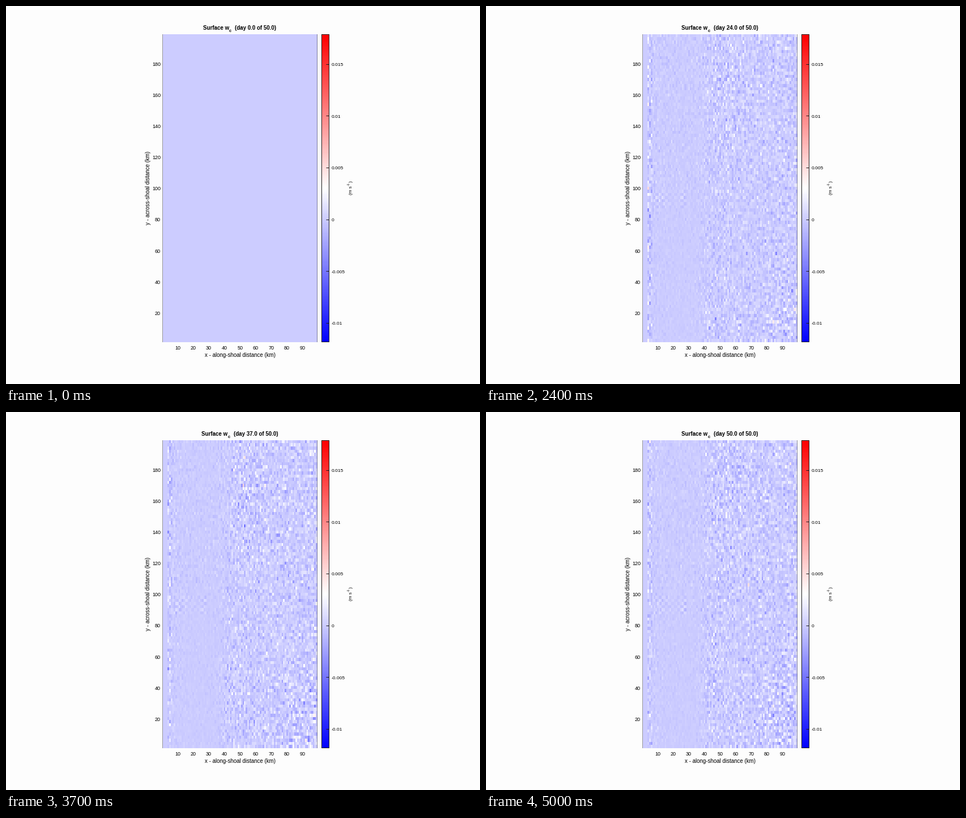
A matplotlib script that plays this animation: 837x669 px, repeating every 5.1 s.

```python
import numpy as np
import matplotlib.pyplot as plt
from matplotlib.animation import FuncAnimation
from matplotlib.colors import LinearSegmentedColormap
from matplotlib.patches import Rectangle

W, H, DPI = 837, 669, 72          # at 72 dpi one point is one pixel
DAYS = 50
N = 99                            # cells per side: 1 km wide, 2 km tall
LEFT, RIGHT, TOP, BOTTOM = 277, 550, 50, 595
VMIN, VMAX = -0.01184, 0.01784

plt.rcParams["font.family"] = "Liberation Sans"
cmap = LinearSegmentedColormap.from_list("bwr256", ["blue", "white", "red"], 256)

fig = plt.figure(figsize=(W / DPI, H / DPI), dpi=DPI, facecolor="#fdfdfd")
ax = fig.add_axes([0, 0, 1, 1])
ax.axis("off")

X, Y = np.meshgrid(np.arange(N) + 1.0, 197.7 - 2 * np.arange(N))


def bump(x0, y0, sx, sy):
    return np.exp(-((X - x0) / sx) ** 2 - ((Y - y0) / sy) ** 2)


def step(v, centre, width):
    return 1 / (1 + np.exp(-(v - centre) / width))


def smooth(v):
    v = np.clip(v, 0, 1)
    return v * v * (3 - 2 * v)


def amplitude(day):
    """Spread of the vertical velocity in mm/s."""
    late = smooth((day - 7) / 22)
    early = 1 - late
    grow = smooth((day + 4) / 26)
    north = step(Y, 100, 4)
    amp = 0.15 + 0.1 * north
    amp = amp + (1.1 - 0.4 * late) * np.exp(-((X - 4.6) / 1.5) ** 2)
    amp += (0.45 - 0.1 * late) * np.exp(-(X - 4) / 5)
    amp += early * 0.28 * north * np.exp(-X / 35)
    amp += 0.2 * early * step(Y, 175, 10)
    amp += late * 0.62 * step(X, 41, 2.5)
    amp += late * 0.4 * bump(55, 165, 11, 45)
    amp += (0.85 - 0.5 * late) * bump(44, 20 + day / 2, 6, 40)
    amp += 0.3 * early * bump(45, 85, 7, 30)
    amp += grow * 0.6 * bump(94, 10, 26, 42)
    amp += 0.5 * bump(97, 5, 6, 16) * early
    amp += (0.5 - 0.35 * late) * np.exp(-(99 - X) / 4)
    amp *= 1 - 0.65 * early * bump(73, 110, 20, 60)
    return amp * (1 - np.exp(-day / 3))


def texture(rng):
    """Grid-scale noise: upright streaks mid-shoal, short dashes in the east."""
    n = rng.standard_normal((N, N))
    m = rng.standard_normal((N, N))
    across = (m - 0.5 * (np.roll(m, 1, 1) + np.roll(m, -1, 1))) / 1.22
    dash = (m + np.roll(m, 1, 1)) / 1.41
    dash = (dash - 0.5 * (np.roll(dash, 1, 0) + np.roll(dash, -1, 0))) / 1.22
    east = step(X, 65, 8)
    mix = 0.85 * n + 0.52 * ((1 - east) * across + east * dash)
    return mix * np.abs(mix) ** 0.2


def field(day):
    if day == 0:
        return np.zeros((N, N))
    rng = np.random.default_rng(400 + day)
    w = amplitude(day) * texture(rng)

    # Standing chequered patch on the western shoal
    i, j = np.meshgrid(np.arange(N), np.arange(N))
    sign = (-1.0) ** (i // 2 + j)
    box = (X > 7) & (X < 29) & (Y > 86) & (Y < 98)
    ends = 0.25 + 0.7 * bump(11, 93, 4, 8) + 0.7 * bump(27, 92, 2, 8)
    swing = rng.uniform(0.2, 1.4, (N, N))
    w += box * ends * sign * swing * (1 - np.exp(-day / 3))

    w[:, :3] = 0
    return w / 1000


def text(x, y, s, size, **kw):
    return ax.text(x, y, s, fontsize=size, color="black", **kw)


def line(xs, ys, width, color="black", alpha=1):
    ax.plot(xs, ys, color=color, lw=width, alpha=alpha,
            solid_capstyle="butt", snap=False)


image = ax.imshow(field(0), cmap=cmap, vmin=VMIN, vmax=VMAX, aspect="auto",
                  interpolation="nearest", extent=(LEFT, RIGHT, BOTTOM, TOP))
ax.imshow(np.linspace(1, 0, 256)[:, None], cmap=cmap, vmin=0, vmax=1,
          aspect="auto", interpolation="nearest", extent=(557, 571, BOTTOM, TOP))
ax.set_xlim(0, W)
ax.set_ylim(H, 0)

for x in (LEFT - 0.5, RIGHT - 0.5):
    line([x, x], [TOP, BOTTOM], 1, alpha=0.4)
ax.add_patch(Rectangle((557.5, 50.5), 13, 544, fill=False, ec="#1a1a1a",
                       lw=1, snap=False))

for km in range(10, 100, 10):
    text(275.5 + 2.755 * km, 607.8, str(km), 9, ha="center")
for km in range(20, 200, 20):
    text(273, 598.7 - 2.756 * km + 3.2, str(km), 9, ha="right")
for k in range(-2, 4):
    y = 378 - 91.65 * k
    row = np.floor(y) + 0.5
    line([565.5, 570.5], [row, row], 1, "#1a1a1a")
    text(574.2, y + 3, f"{0.005 * k:g}", 8.4)

text(413.4, 621, "x - along-shoal distance (km)", 9.8, ha="center")
upright = dict(rotation=90, rotation_mode="anchor")
text(254, 322, "y - across-shoal distance (km)", 9.8, ha="center", **upright)
for y, x, s, size in ((333.5, 611, "(m s", 8.1), (317.5, 607, "-1", 6.2),
                      (311.8, 611, ")", 8.1)):
    text(x, y, s, size, **upright)

head = text(0, 41.5, "Surface w", 9.8, weight="bold")
sub = text(0, 46, "c", 7.8, weight="bold")
tail = text(0, 41.5, "", 9.8, weight="bold")


def update(day):
    image.set_data(field(day))
    x = 347.7 if day < 10 else 345
    for part, dx in ((head, 0), (sub, 46.4), (tail, 56.6)):
        part.set_x(x + dx)
    tail.set_text(f"(day {day:.1f} of {DAYS:.1f})")
    return image, head, sub, tail


anim = FuncAnimation(fig, update, frames=DAYS + 1, interval=100,
                     repeat=True, repeat_delay=0, blit=False)
plt.show()
```
